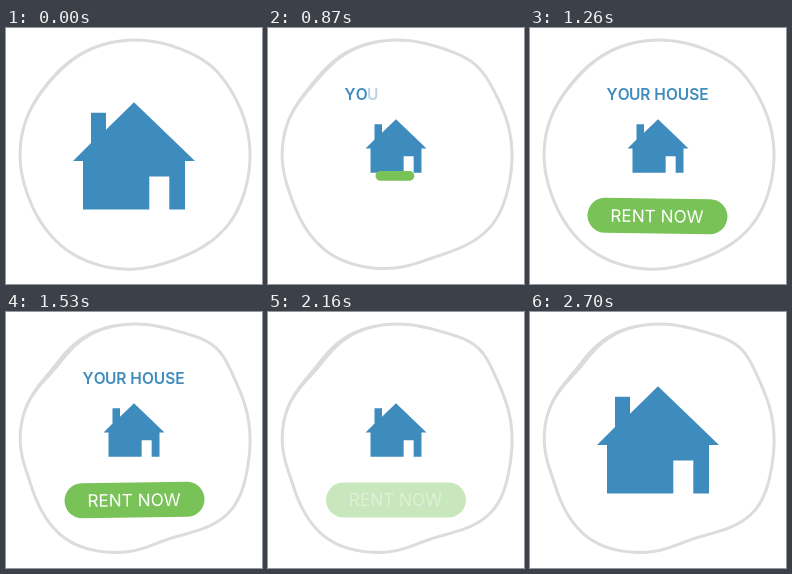
These frames come from a looping animation (256 px wide and 256 px high, 2730 ms). An HTML page with a canvas:

```html
<!DOCTYPE html>
<html lang="en">
<head>
<meta charset="utf-8">
<title>House for rent</title>
<style>
  html, body { margin: 0; height: 100%; overflow: hidden; background: #fff; }
  canvas { display: block; }
</style>
</head>
<body>
<canvas id="stage" width="256" height="256"></canvas>
<script>
const ctx = document.getElementById('stage').getContext('2d');
const LOOP = 2730, TICK = 30, HOLD = 150;
const BLUE = '#3e8bbe', GREEN = '#79c257', GREY = '#dcdcdc';
const FONT = 'Inter, "Liberation Sans", sans-serif';
const TITLE = 'YOUR HOUSE';

// The ring is a circle with soft lumps [angle, height, width], more or less pronounced in each pose
const LUMPS = [[35, 5, 17], [71, -9.5, 20], [125, 6.5, 20], [160, -2, 12], [220, -7.5, 19], [311, 7, 14]];
const POSES = [0.3, 0.65, 1, 1.1];

const HOUSE = new Path2D('M128 74.3L189 133H179V181.6H163.3V148.5H143.3V181.6H77V133H67L85 115V84.7H100V101.7Z');

const ramp = (t, from, to) => Math.min(1, Math.max(0, (t - from) / (to - from)));
const ease = p => p * p * (3 - 2 * p);
const bell = (x, mid, width) => Math.exp(-(((x - mid) / width) ** 2));

function traceRing(pose, side) {
  for (let deg = 0; deg < 360; deg += 3) {
    const lump = LUMPS.reduce((sum, [mid, height, width]) => sum + height * bell(deg, mid, width), 0);
    const half = 1.5 + pose * bell(deg, 228, 20);
    const r = 115 + pose * lump + side * half, a = deg * Math.PI / 180;
    ctx.lineTo(129 + r * Math.cos(a), 127 + r * Math.sin(a));
  }
  ctx.closePath();
}

function drawRing(pose) {
  ctx.fillStyle = GREY;
  ctx.beginPath();
  traceRing(pose, 1);
  ctx.moveTo(129 + 115 - 1.5, 127);
  traceRing(pose, -1);
  ctx.fill('evenodd');
}

function drawHouse(t) {
  const small = ease(ramp(t, 720, 850)) - ease(ramp(t, 2220, 2380));
  const s = 1 - small / 2;
  ctx.save();
  ctx.translate(64 * small, 54 * small);
  ctx.scale(s, s);
  ctx.fillStyle = BLUE;
  ctx.fill(HOUSE);
  ctx.restore();
}

function drawTitle(t) {
  ctx.font = '600 15.5px ' + FONT;
  ctx.textAlign = 'left';
  ctx.fillStyle = BLUE;
  [...TITLE].forEach((ch, i) => {
    const shown = 785 + 35 * i, gone = 1785 + 28 * (TITLE.length - 1 - i);
    ctx.globalAlpha = ramp(t, shown, shown + 40) * (1 - ramp(t, gone, gone + 40));
    ctx.fillText(ch, 76.6 + ctx.measureText(TITLE.slice(0, i)).width, 72);
  });
  ctx.globalAlpha = 1;
}

function drawButton(t) {
  const grow = ramp(t, 820, 1000), alpha = 1 - ramp(t, 2070, 2220);
  if (!grow || !alpha) return;
  const shake = t > 1200 && t < 1650 ? Math.sin((t - 1200) / 90 * Math.PI) : 0;
  ctx.save();
  ctx.translate(128 - 1.5 * (1 - grow) - 0.6 * shake, 132.5 + 55.5 * grow);
  ctx.rotate(shake * 0.014);
  ctx.scale(grow, grow);
  ctx.globalAlpha = alpha;
  ctx.fillStyle = GREEN;
  ctx.beginPath();
  ctx.roundRect(-70, -17.5, 140, 35, 17.5);
  ctx.fill();
  ctx.globalAlpha = alpha * ramp(grow, 0.3, 0.8);
  ctx.fillStyle = '#fff';
  ctx.font = '17.2px ' + FONT;
  ctx.textAlign = 'center';
  ctx.fillText('RENT NOW', -0.5, 6.3);
  ctx.restore();
}

function draw(now) {
  const t = Math.floor(now % LOOP / TICK) * TICK;
  ctx.fillStyle = '#fff';
  ctx.fillRect(0, 0, 256, 256);
  drawRing(POSES[Math.floor(t / HOLD) % POSES.length]);
  drawHouse(t);
  drawTitle(t);
  drawButton(t);
}

const start = performance.now();
function loop() {
  draw(performance.now() - start);
  requestAnimationFrame(loop);
}
loop();
</script>
</body>
</html>
```
